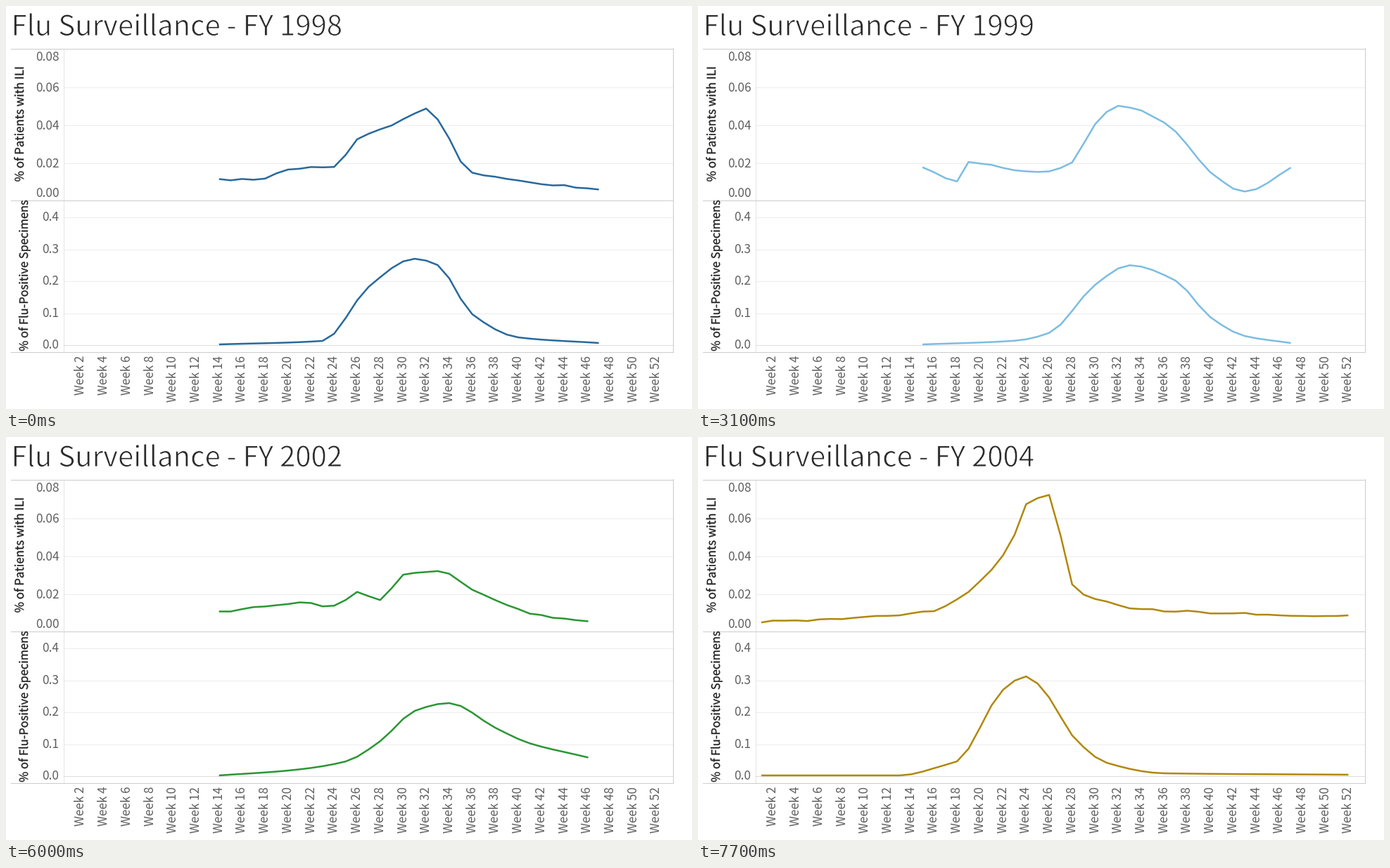
A matplotlib script that plays this animation: 975 by 574 pixels, repeating every 8 s.

```python
import numpy as np
import matplotlib.pyplot as plt
from matplotlib.animation import FuncAnimation
from matplotlib.patheffects import Stroke

W, H, DPI = 975, 574, 100
STEP, LOOP = 100, 8000
PT = 72 / DPI
WEEKS = np.arange(1, 53)
ILI_ZERO, FLU_ZERO = 277, 482.5
ILI_GAP, FLU_GAP = 54, 45.6
LEFT, RIGHT = 81.5, 947.5

plt.rcParams["font.family"] = ["Noto Sans CJK JP", "DejaVu Sans"]


def week_x(week):
    return 73.7 + 16.36 * week


def curve(keys, weeks):
    """Monotone cubic through (week, height) key points."""
    k, h = np.array(keys, float).T
    gap = np.diff(k)
    d = np.diff(h) / gap
    prod = d[:-1] * d[1:]
    inner = np.where(prod > 0, 2 * prod / np.where(prod > 0, d[:-1] + d[1:], 1), 0)
    m = np.concatenate([d[:1], inner, d[-1:]])
    i = np.clip(np.searchsorted(k, weeks, "right") - 1, 0, len(d) - 1)
    u = (weeks - k[i]) / gap[i]
    v = 1 - u
    return (v * v * (1 + 2 * u) * h[i] + u * u * (3 - 2 * u) * h[i + 1]
            + gap[i] * u * v * (v * m[i] - u * m[i + 1]))


def season(year, color, ili, flu):
    """Key heights in px above each zero line; weeks outside collapse on the ends."""
    weeks = np.clip(WEEKS, ili[0][0], ili[-1][0])
    noise = np.random.default_rng(year).uniform(-1.5, 1.5, WEEKS.size + 1)
    return dict(year=year, rgb=np.array(plt.matplotlib.colors.to_rgb(color)),
                pts=np.array([week_x(weeks),
                              ILI_ZERO + .5 - curve(ili, weeks) - noise[weeks],
                              FLU_ZERO + .5 - curve(flu, weeks)]))


seasons = [
    season(1998, "#27699d",
           ili=[(14, 30), (17, 30), (21, 47), (24, 48), (26, 87), (29, 107),
                (32, 130), (36, 41), (47, 15)],
           flu=[(14, 1), (23, 6), (27, 83), (31, 123), (33, 114), (36, 44),
                (40, 11), (47, 3)]),
    season(1999, "#7bbde3",
           ili=[(15, 48), (18, 28), (19, 55), (25, 41), (28, 55), (30, 110),
                (32, 136), (36, 113), (41, 27), (43, 13), (47, 49)],
           flu=[(15, 1), (23, 6), (26, 17), (30, 86), (33, 114), (37, 92),
                (40, 40), (43, 13), (47, 3)]),
    season(2000, "#f07f10",
           ili=[(15, 28), (16, 43), (23, 49), (25, 75), (27, 145), (28, 141),
                (29, 104), (31, 63), (34, 37), (39, 25), (47, 11)],
           flu=[(15, 5), (18, 11), (22, 50), (24, 73), (27, 118), (31, 58),
                (33, 52), (36, 21), (39, 7), (47, 0)]),
    season(2001, "#f9b05c",
           ili=[(15, 37), (21, 41), (25, 56), (27, 92), (29, 86), (31, 109),
                (33, 95), (36, 47), (40, 32), (47, 16)],
           flu=[(15, 0), (22, 6), (25, 18), (28, 55), (31, 103), (34, 70),
                (36, 55), (37, 33), (44, 5), (47, 3)]),
    season(2002, "#289532",
           ili=[(14, 28), (21, 41), (24, 36), (26, 56), (28, 45), (30, 81),
                (33, 87), (36, 61), (42, 23), (46, 16)],
           flu=[(14, 1), (20, 8), (25, 21), (28, 50), (31, 93), (34, 104),
                (38, 69), (41, 47), (46, 27)]),
    season(2003, "#5fc762",
           ili=[(14, 31), (24, 40), (26, 62), (28, 51), (32, 91), (34, 85),
                (35, 66), (40, 32), (44, 20), (52, 19)],
           flu=[(14, 0), (23, 3), (27, 20), (29, 42), (33, 111), (35, 92),
                (38, 61), (41, 21), (44, 26), (46, 8), (52, 1)]),
    season(2004, "#b0880a",
           ili=[(1, 14), (9, 20), (16, 30), (18, 45), (21, 89), (23, 138),
                (24, 182), (26, 194), (28, 68), (29, 52), (35, 31), (52, 22)],
           flu=[(1, 1), (13, 1), (17, 16), (18, 21), (22, 123), (24, 142),
                (26, 112), (28, 58), (31, 19), (36, 4), (52, 2)]),
]

# Start and end (ms) of the morph from each season to the next.
MORPHS = [(1200, 2300), (3000, 4000), (4000, 4400),
          (5060, 5600), (5930, 6400), (7000, 7400)]

fig = plt.figure(figsize=(W / DPI, H / DPI), dpi=DPI, facecolor="white")
ax = fig.add_axes([0, 0, 1, 1])
ax.set_xlim(0, W)
ax.set_ylim(H, 0)
ax.axis("off")


def rule(x0, y0, x1, y1, color, **kw):
    ax.plot([x0, x1], [y0, y1], color=color, lw=PT, zorder=1, **kw)


def label(x, y, s, px, color, edge=None, width=0, **kw):
    """Text whose outline thickens it (own colour) or thins it (white)."""
    t = ax.text(x, y, s, fontsize=px * PT, color=color, **kw)
    if edge:
        t.set_path_effects([Stroke(linewidth=width * PT, foreground=edge)])
    return t


# Grid, frame and zero line
grid = [ILI_ZERO - ILI_GAP * k for k in (1, 2, 3)]
grid += [round(FLU_ZERO - FLU_GAP * k) for k in (1, 2, 3, 4)]
for y in grid:
    rule(LEFT, y + .5, RIGHT, y + .5, "#ececec")
rule(LEFT, 61, LEFT, 493, "#e4e4e4")
rule(LEFT, FLU_ZERO, RIGHT, FLU_ZERO, "#bdbdbd", ls=(0, (1, 1)))
for y in (60.5, 276.5, 492.5):
    rule(7, y, RIGHT, y, "#cccccc")
rule(RIGHT, 60, RIGHT, 493, "#cccccc")

# Axis labels
TICK, INK = "#606060", "#222222"
ends = dict(ha="right", va="center_baseline")
for k in range(5):
    # The outer labels are nudged inside the panel.
    y = np.clip(ILI_ZERO - ILI_GAP * k, 72, 266)
    label(75.5, y - .5, f"{.02 * k:.2f}", 17.4, TICK, **ends)
    label(75.5, FLU_ZERO - FLU_GAP * k - 1, f"{.1 * k:.1f}", 17.4, TICK, **ends)
for week in range(2, 53, 2):
    label(week_x(week), 498, f"Week {week}", 17, TICK,
          rotation=90, ha="center", va="top")
for x, y, s, px in ((20.5, 168, "% of Patients with ILI", 16.8),
                    (26.5, 384, "% of Flu-Positive Specimens", 16.4)):
    label(x, y, s, px, INK, INK, .35, rotation=90, ha="center", va="center")

title = label(7.5, 42, "", 40.1, "#2a2a2a", "white", .9, ha="left", va="baseline")
lines = [ax.plot([], [], lw=2.5 * PT, zorder=3, solid_joinstyle="round",
                 solid_capstyle="butt")[0] for _ in range(2)]


def ease(u):
    u = min(max(u, 0), 1)
    return 4 * u ** 3 if u < .5 else 1 - 4 * (1 - u) ** 3


def update(frame):
    t = frame * STEP
    n = max(sum(t > start for start, _ in MORPHS) - 1, 0)
    start, end = MORPHS[n]
    p = ease((t - start) / (end - start))
    a, b = seasons[n], seasons[n + 1]
    x, *ys = a["pts"] + (b["pts"] - a["pts"]) * p
    rgb = a["rgb"] + (b["rgb"] - a["rgb"]) * p
    for line, y in zip(lines, ys):
        line.set_data(x, y)
        line.set_color(tuple(rgb))
    year = b["year"] if p > .02 else a["year"]
    title.set_text(f"Flu Surveillance - FY {year}")
    return [title, *lines]


anim = FuncAnimation(fig, update, frames=LOOP // STEP, interval=STEP,
                     init_func=lambda: update(0), repeat=True, repeat_delay=0)
plt.show()
```
